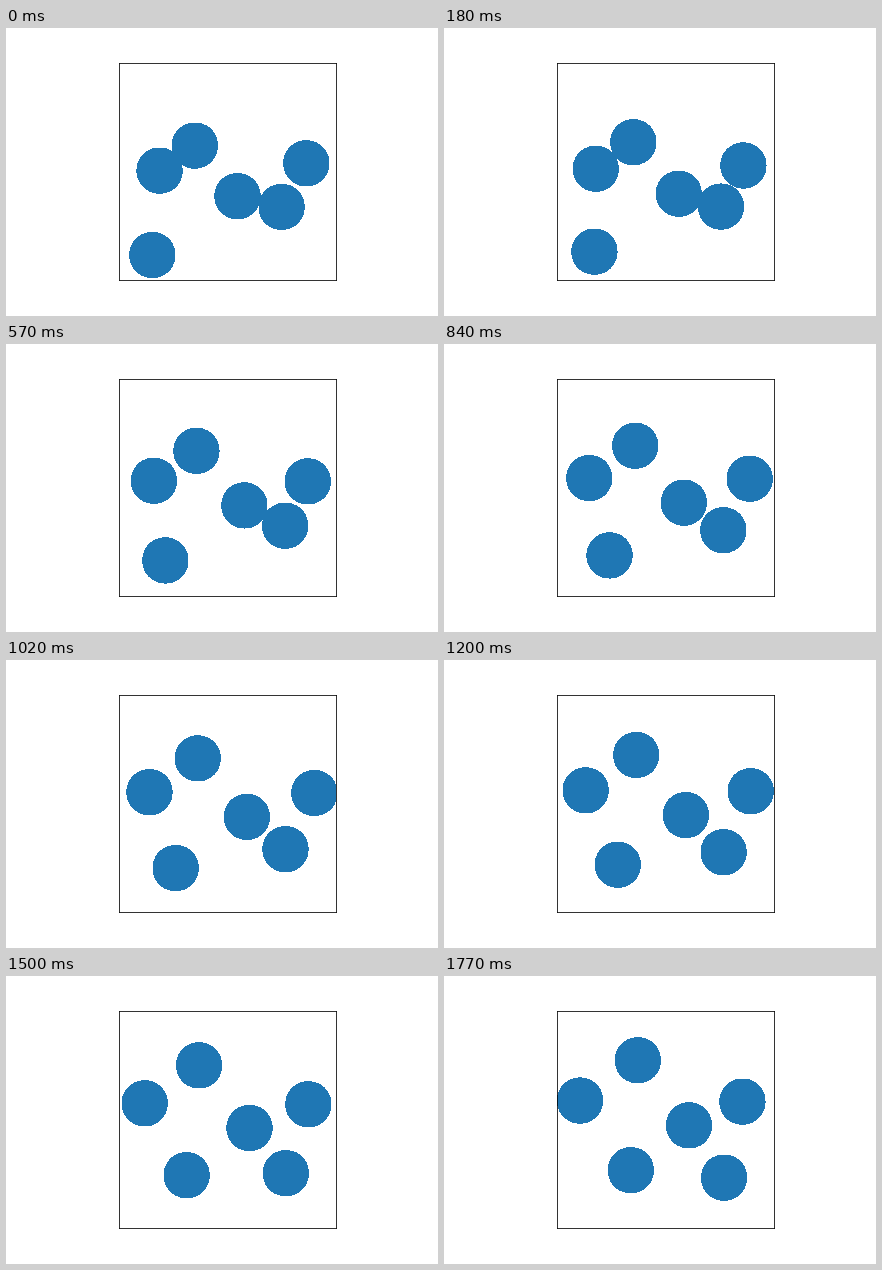
These frames come from a looping animation (432x288 px, 1.8 s). A matplotlib script:

```python
import numpy as np
import matplotlib.pyplot as plt
from matplotlib.animation import FuncAnimation
from matplotlib.patches import Circle

W, H, DPI = 432, 288, 72
FRAMES, STEP = 60, 30
SIDE = 0.755 * H
LEFT, BOTTOM = 0.5125 * W - SIDE / 2, 0.875 * H
RADIUS = 22.6
WALL = 308.8  # where a ball's centre turns back on the right


class Ball:
    def __init__(self, start, speed):
        self.start, self.speed = np.array(start), np.array(speed)
        self.kicks = []
        self.disc = Circle(start, RADIUS, fc="C0", lw=0, antialiased=False)

    def move(self, t):
        pos = self.start + self.speed * t
        for at, kick in self.kicks:
            pos = pos + kick * max(0, t - at)
        pos[0] = WALL - abs(WALL - pos[0])
        self.disc.center = pos


def collide(a, b, at, kick):
    """Two equal balls trade momentum at a given time."""
    a.kicks.append((at, np.array(kick)))
    b.kicks.append((at, -np.array(kick)))


# Positions in pixels, speeds in pixels per second.
balls = [
    Ball((153.55, 142.6), (-9.9, -10.2)),
    Ball((188.8, 117.6), (2.85, -18.85)),
    Ball((146.3, 227.0), (22.9, -18.55)),
    Ball((231.5, 168.2), (18.2, -13.6)),
    Ball((275.6, 178.9), (7.5, -1.8)),
    Ball((300.3, 135.3), (-4.9, 12.1)),
]
center, lower, right = balls[3:]
collide(center, lower, 0.295, (-12.7, 3.5))
collide(lower, right, 0.35, (-19.4, 21.9))

fig = plt.figure(figsize=(W / DPI, H / DPI), dpi=DPI, facecolor="white")
ax = fig.add_axes([LEFT / W, 1 - BOTTOM / H, SIDE / W, SIDE / H])
ax.set(xlim=(LEFT, LEFT + SIDE), ylim=(BOTTOM, BOTTOM - SIDE),
       xticks=[], yticks=[])
for ball in balls:
    ax.add_patch(ball.disc)


def update(i):
    for ball in balls:
        ball.move(i * STEP / 1000)
    return [ball.disc for ball in balls]


anim = FuncAnimation(fig, update, frames=FRAMES, interval=STEP,
                     repeat=True, repeat_delay=0)
plt.show()
```
